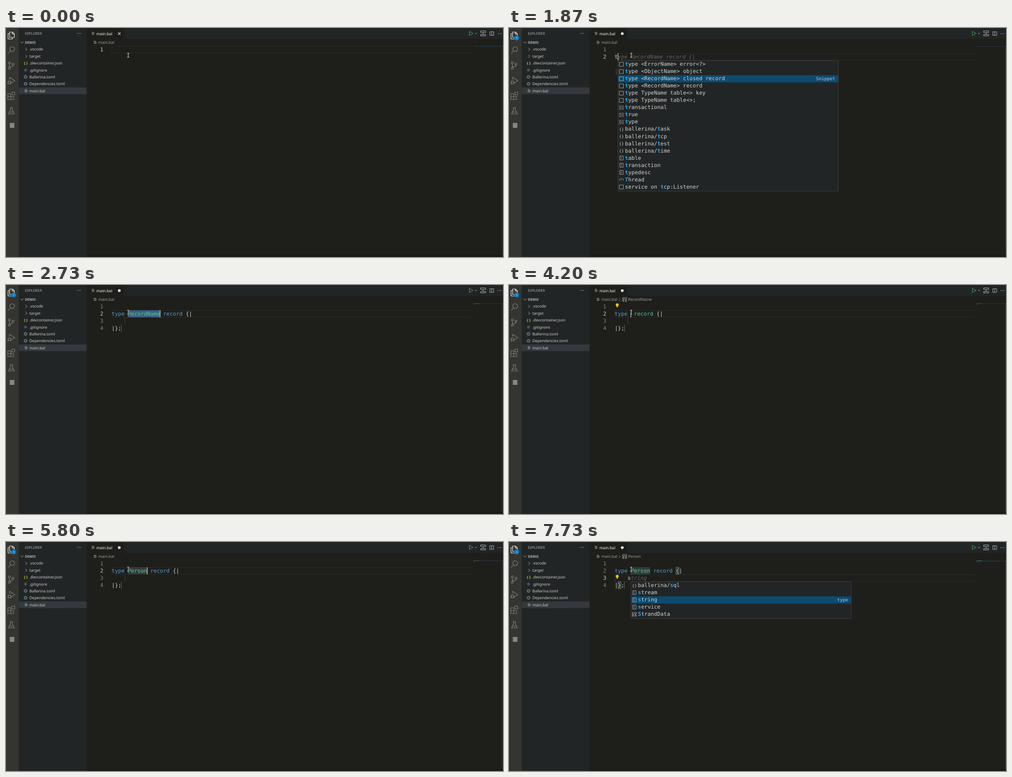
Animation of 1101 by 509 pixels, one loop 8000 ms. Source, as an HTML page:

```html
<!DOCTYPE html>
<html lang="en">
<head>
<meta charset="utf-8">
<title>Editor completion demo</title>
<style>
html, body { margin: 0; width: 100%; height: 100%; overflow: hidden; background: #1e1f1b; }
svg { display: block; width: 100vw; height: 100vh; }
text { white-space: pre; text-rendering: geometricPrecision; }
.ui { font: 8.65px "Noto Sans", "Open Sans", sans-serif; fill: #cfd1ce; }
.cap { font-size: 7.75px; fill: #b5b7b4; }
.b { font-weight: bold; }
.dim { fill: #a0a29d; }
.white { fill: #fff; }
.code { font: 11.86px "DejaVu Sans Mono", monospace; fill: #d2d3cf; }
.kw { fill: #569cd6; }
.type { fill: #4ec9a5; }
.ghost { fill: #62645f; font-style: italic; }
.num { fill: #7f817b; }
.num.on { fill: #c8c9c5; }
.hit { fill: #22a7f5; font-weight: bold; }
.detail { font-size: 10px; fill: #bccad3; }
.ln { fill: none; stroke: #858781; stroke-width: 1.1; }
.lt { fill: none; stroke: #c5c7c3; stroke-width: .9; }
</style>
</head>
<body>
<svg viewBox="0 0 1101 509" xmlns="http://www.w3.org/2000/svg">
  <rect width="1101" height="509" fill="#1e1f1b"/>
  <rect x="178" y="504.5" width="923" height="4.5" fill="#1a1b18"/>
  <rect width="28.5" height="509" fill="#343530"/>
  <rect x="28.5" width="150" height="509" fill="#222525"/>
  <rect x="262" width="839" height="24" fill="#222525"/>
  <rect x="28.5" y="132" width="150" height="15" fill="#35383d"/>
  <rect x="1100" y="40" width="1" height="465" fill="#40483e"/>

  <!-- activity bar -->
  <g class="ln">
    <path d="M8 9h6.500l4 4v8h-10.500zM14 9v4.500h4M8 12.500h-3.500v12h9.500v-3" stroke="#eceeea" stroke-width="1.2"/>
    <circle cx="13.8" cy="47" r="5.300"/><path d="M10 51l-5.500 6"/>
    <circle cx="7.5" cy="77.500" r="2.200"/><circle cx="7.5" cy="89.500" r="2.200"/><circle cx="15.5" cy="80.500" r="2.200"/>
    <path d="M7.500 79.700v7.600M15.500 82.700c0 3-3 3.300-8 4"/>
    <path d="M8 115v-5.500l11.500 7.500-8 5.200"/><circle cx="7.5" cy="121" r="3"/>
    <path d="M4.500 117.500l1.500 1.500M10.500 117.500l-1.500 1.500M3 121h1.500M10.500 121h1.500M4 125l1.500-1.500M11 125l-1.500-1.500"/>
    <path d="M4 146h6.500v6.500h6.500v6.500h-13zM4 152.500h6.500v6.500M13 142.500h6.300v6.300h-6.300z"/>
    <path d="M8.500 177h7M10 177v5l-4.500 9h13l-4.500-9v-5M8 187h8"/>
  </g>
  <rect x="8.5" y="211" width="10" height="11" fill="#858781"/>

  <!-- explorer -->
  <text class="ui cap" x="42" y="15.4">EXPLORER</text>
  <g id="dots" fill="#c5c7c3"><circle cx="158.5" cy="12" r=".8"/><circle cx="162" cy="12" r=".8"/><circle cx="165.5" cy="12" r=".8"/></g>
  <path class="lt" d="M32 30.500l3.300 3.300 3.300-3.300M43 44.200l3.300 3.300-3.300 3.300M43 59.600l3.300 3.300-3.300 3.300"/>
  <text class="ui cap b" x="42" y="35">DEMO</text>
  <g id="files"></g>
  <text class="ui b" x="39.5" y="80.6" style="fill:#cbcb41;font-size:8px">{ }</text>
  <circle cx="43.2" cy="93.5" r="3.2" fill="#41535b"/>
  <g fill="none" stroke="#6d8086">
    <g id="gear"><circle cx="43.3" cy="108.7" r="2.5" stroke-width="1.3"/><circle cx="43.3" cy="108.7" r="3.6" stroke-width="1.3" stroke-dasharray="1.4 1.43"/></g>
    <use href="#gear" y="15.4"/>
  </g>
  <path id="lines" class="lt" d="M41.500 137h4.500M41.500 139.400h6.500M41.500 141.800h5.500"/>

  <!-- tab, breadcrumb, actions -->
  <use href="#lines" x="148.5" y="-127.5"/>
  <use href="#lines" x="153" y="-107.5"/>
  <text class="ui white" x="200.3" y="15.7">main.bal</text>
  <text class="ui dim" x="204.8" y="35.3">main.bal</text>
  <path d="M1026.500 7.300v9.400l8-4.700z" fill="none" stroke="#56a871"/>
  <g class="lt">
    <path d="M1039 11l2.200 2.200 2.200-2.200"/>
    <path d="M1051.500 6.500h11v3.500h-11zM1051.500 14.500h11v3h-11zM1057 10v4.500"/>
    <path d="M1071.800 8.300h8.500v8h-8.500zM1076 8.300v8"/>
  </g>
  <use href="#dots" x="931.5" y=".5"/>

  <g id="live"></g>

  <!-- mouse pointer -->
  <g fill="none" stroke-linecap="square">
    <path d="M268.800 56h4M268.800 65h4M270.800 56v9" stroke="#111" stroke-width="2.6"/>
    <path d="M268.800 56h4M268.800 65h4M270.800 56v9" stroke="#eee" stroke-width="1.1"/>
  </g>
</svg>
<script>
const LOOP = 8000, LEFT = 234, CH = 7.14, ROW = 16.03;
const live = document.getElementById('live');
const colX = col => LEFT + col * CH;
const lineY = line => 40 + (line - 1) * ROW;
const esc = s => s.replace(/&/g, '&amp;').replace(/</g, '&lt;');
const rect = (x, y, w, h, fill, extra = '') =>
  `<rect x="${x}" y="${y}" width="${w}" height="${h}" fill="${fill}" ${extra}/>`;
const text = (x, y, s, cls, extra = '') => `<text class="${cls}" x="${x}" y="${y}" ${extra}>${esc(s)}</text>`;
const path = (d, stroke = '#b4b6b2', w = .9) => `<path d="${d}" fill="none" stroke="${stroke}" stroke-width="${w}"/>`;
const code = (line, col, s, cls = '') => text(colX(col), lineY(line) + 12.1, s, 'code ' + cls);

document.getElementById('files').innerHTML =
  ['.vscode', 'target', '.devcontainer.json', '.gitignore', 'Ballerina.toml', 'Dependencies.toml', 'main.bal']
    .map((s, i) => text(51.8, 50.4 + i * 15.4, s, 'ui')).join('');

// Each entry: icon kind, label; a '*' precedes the matched letters.
const typeRows = [
  ['snip', '*type <ErrorName> error<?>'], ['snip', '*type <ObjectName> object'],
  ['snip', '*type <RecordName> closed record'], ['snip', '*type <RecordName> record'],
  ['snip', '*type TypeName table<> key'], ['snip', '*type TypeName table<>;']
];
const popups = {
  t: { x: 241, y: 72.3, pick: 2, detail: 'Snippet', hit: 1, rows: [...typeRows,
    ['key', '*transactional'], ['key', '*true'], ['key', '*type'],
    ['mod', 'ballerina/*task'], ['mod', 'ballerina/*tcp'], ['mod', 'ballerina/*test'], ['mod', 'ballerina/*time'],
    ['enum', '*table'], ['enum', '*transaction'], ['enum', '*typedesc'],
    ['param', '*Thread'], ['snip', 'service on *tcp:Listener']] },
  ty: { x: 241, y: 72.3, pick: 2, detail: 'Snippet', hit: 2, rows: [...typeRows, ['key', '*type']] },
  s: { x: 269.5, y: 88.3, pick: 2, detail: 'type', hit: 1, rows: [
    ['mod', 'ballerina/*sql'], ['enum', '*stream'], ['enum', '*string'], ['enum', '*service'], ['struct', '*StrandData']] }
};

// Icons are centred on x, y.
const at = (x, y, body) => `<g transform="translate(${x} ${y})">${body}</g>`;
const icons = {
  snip: path('M-4.500-4.200h9v8.700h-9z'),
  key: path('M-5-3.500h4M1-3.500h4M-5-1h6M3-1h2M-5 1.500h3M0 1.500h5M-5 4h5M2 4h3'),
  mod: text(-4.9, 3, '{}', 'code', 'style="font-size:8.500px"'),
  enum: path('M-3.500-4.500h7.500v9h-7.500zM-1.500-2h2M-1.500 0h2M-1.500 2h2'),
  param: text(-2, 2.3, 'T', 'code b', 'style="font-size:6.500px"') + path('M-3-1.800l-2 1.800 2 1.800M3-1.800l2 1.800-2 1.800'),
  struct: path('M-4.500-4h9v3h-9zM-4.500 1.500h3v2.800h-3zM1.500 1.500h3v2.800h-3zM-3-1v2.500M3-1v2.500')
};

function popup({ x, y, pick, detail, hit, rows }) {
  const h = rows.length * ROW + 1.7;
  let out = rect(x + .5, y, 488, h, '#222525', 'stroke="#3f413e"') +
    rect(x + 1, y + .5 + pick * ROW, 487, ROW, '#0c4a70');
  rows.forEach(([kind, label], i) => {
    const top = y + .5 + i * ROW, tx = x + 16;
    const n = label.indexOf('*'), s = label.replace('*', '');
    const part = (a, b, cls) => a < b ? text(tx + a * CH, top + 11.4, s.slice(a, b), 'code ' + cls) : '';
    out += at(x + 8, top + 7.8, icons[kind]) + part(0, n, '') + part(n, n + hit, 'hit') + part(n + hit, s.length, '');
  });
  return out + text(x + 481.5 - detail.length * 6.02, y + pick * ROW + 11.3, detail, 'code detail');
}

const bulb = y => at(239.7, y, '<circle cy="-1.2" r="3.2" fill="#ffcc00"/>' +
  rect(-1.6, 1, 3.2, 1.6, '#ffcc00') + rect(-1.4, 3.1, 2.8, 1.3, '#d8d8d0'));

const minimap = s => {
  const y = s.lines === 1 ? 40 : s.at === 3 ? 42 : 41;
  let out = rect(1035, y, 65, 1, s.lines === 1 ? '#20455a' : s.at === 3 ? '#28435a' : '#2c3550');
  if (s.lines === 4) {
    const w = (15 + s.name.length) * .56;
    out += rect(1036, 41, 2.4, 1, '#496583') + rect(1039, 41, w - 3, 1, '#46665f') + rect(1036, 43.6, 1.6, 1, '#646661');
    if (s.field) out += rect(1038.3, 42.4, 1, 1, '#777');
  }
  return out;
};

function draw(s) {
  const top = lineY(s.at);
  let out = rect(LEFT + .5, top + .5, 797, ROW - 1, 'none', 'stroke="#2b2d29"') + rect(1031, top, 1, ROW, '#1e1f1b');
  for (let i = 1; i <= s.lines; i++)
    out += text(215.7, lineY(i) + 12.1, '' + i, 'code num' + (i === s.at ? ' on' : ''), 'text-anchor="end"');

  if (s.lines === 4) {
    const end = 5 + s.name.length;
    if (s.name) out += rect(colX(5), lineY(2), s.name.length * CH, ROW, s.sel ? '#3b5f7c' : '#373b38');
    out += rect(s.field ? LEFT : 263, lineY(3), 1, ROW, '#42443f') + rect(255, lineY(4), 1, ROW, '#6b6d68');
    if (s.at === 3) for (const [line, col] of [[2, end + 8], [4, 1]])
      out += rect(colX(col) + .3, lineY(line) + .5, CH - .6, ROW - 1, '#1d2d1d', 'stroke="#858781"');
    out += code(2, 0, 'type', 'kw') + code(2, 5, s.name, 'type') +
      code(2, end + 1, 'record', s.name ? 'kw' : 'type') + code(2, end + 8, '{|') +
      code(3, 4, s.field) + code(4, 0, '|};');
    if (s.pop) out += code(3, 5, 'tring', 'ghost');
  } else if (s.typed) {
    out += code(2, 0, s.typed);
    if (s.pop) out += code(2, s.typed.length, 'type RecordName record {|'.slice(s.typed.length), 'ghost') +
      code(4, 0, '|};', 'ghost');
  }

  out += minimap(s);
  if (s.crumb) out += path('M243.500 29.500l3 3-3 3', '#a0a29d') + at(256, 32.2, icons.struct) + text(263.8, 35.3, s.crumb, 'ui dim');
  out += s.dirty ? '<circle cx="251" cy="12.5" r="2.9" fill="#fff"/>' : path('M248.300 9.800l5.400 5.400M253.700 9.800l-5.400 5.400', '#eceeea', 1.1);
  if (s.badge) out += '<circle cx="17" cy="22" r="5.6" fill="#0a7acb"/>' +
    text(17, 24.5, '1', 'ui white', 'text-anchor="middle" style="font-size:6.500px"');
  if (s.pop) out += popup(popups[s.pop]);
  if (s.bulb) out += bulb(s.bulb === 3 ? 77.3 : 45.2);
  if (s.on) out += rect(colX(s.col) - .3, top, 1.3, ROW, '#d0d1cd');
  live.innerHTML = out;
}

const type = (t, name) => [t, { name, col: 5 + name.length, on: 1 }];
const steps = [
  [0, { lines: 1, at: 1, col: 0, on: 0, typed: '', name: '', field: '' }],
  [600, { lines: 2, at: 2, on: 1 }], [670, { dirty: 1 }], [800, { badge: 1 }],
  [1070, { on: 0 }], [1600, { on: 1 }],
  [1730, { typed: 't', col: 1 }], [1870, { pop: 't' }],
  [1930, { typed: 'ty', col: 2, pop: 'ty' }], [2400, { on: 0 }],
  [2730, { lines: 4, name: 'RecordName', col: 15, on: 1, sel: 1, pop: '' }],
  [2930, { bulb: 2 }], [3070, { crumb: 'RecordName' }], [3130, { on: 0 }], [3600, { on: 1 }],
  [4200, { name: '', col: 5, sel: 0 }], [4400, { bulb: 0 }], [4470, { crumb: '' }], [4600, { on: 0 }],
  type(4930, 'P'), type(5130, 'Pe'), type(5330, 'Per'), type(5470, 'Pers'), type(5670, 'Perso'), type(5800, 'Person'),
  [6070, { bulb: 2, crumb: 'Person' }], [6270, { on: 0 }],
  [6600, { at: 3, col: 4, on: 1 }], [6800, { bulb: 0 }], [7070, { on: 0 }],
  [7270, { field: 's', col: 5, on: 1 }], [7400, { pop: 's' }], [7470, { bulb: 3 }], [7730, { on: 0 }]
];

let shown = -1;
const start = performance.now();
function tick() {
  const t = (performance.now() - start) % LOOP;
  const count = steps.filter(([from]) => from <= t).length;
  if (count !== shown) {
    shown = count;
    draw(Object.assign({}, ...steps.slice(0, count).map(step => step[1])));
  }
  requestAnimationFrame(tick);
}
tick();
</script>
</body>
</html>
```
